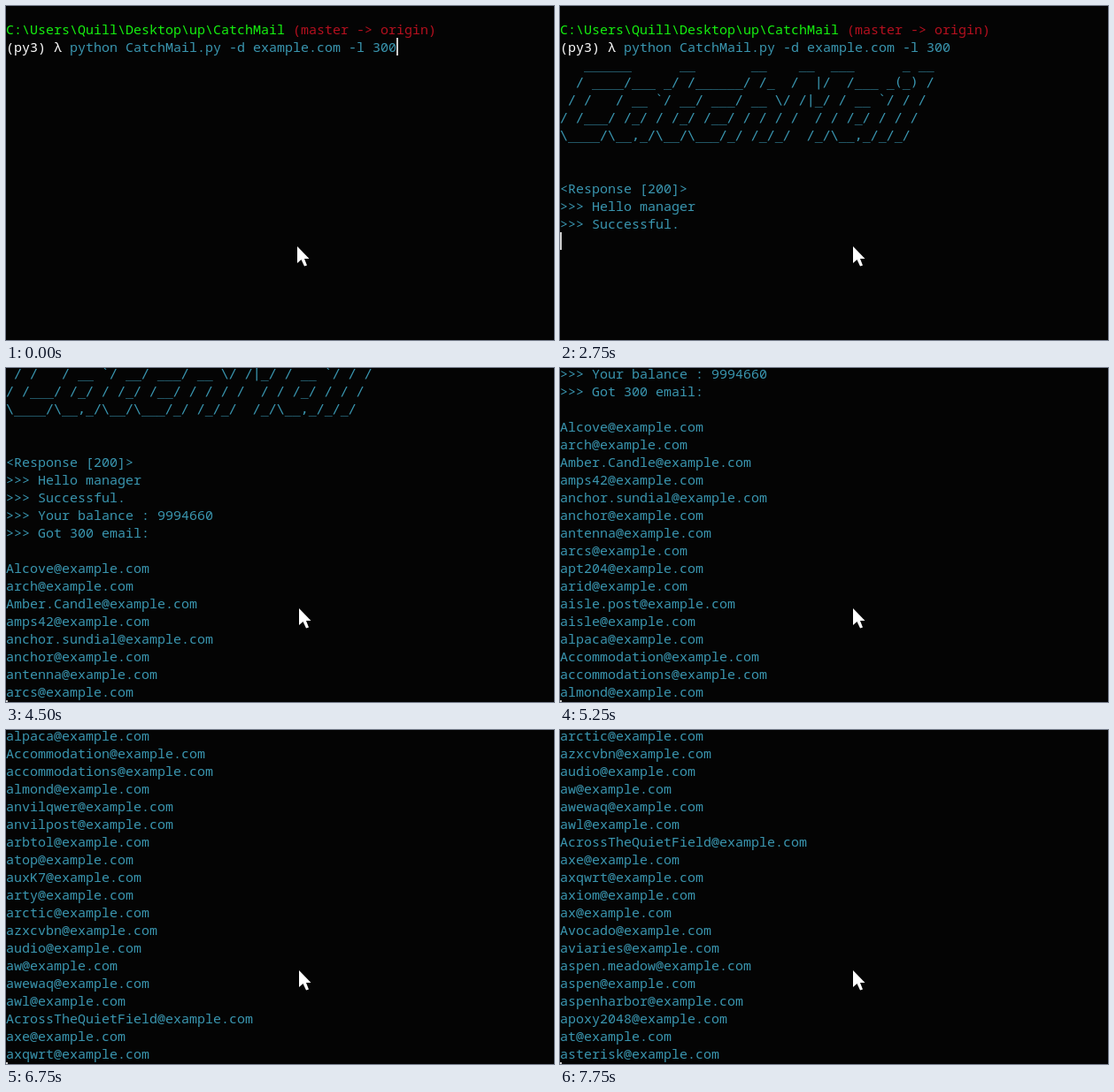
Write an HTML page that moves like this. It is 619 px wide and 378 px high and loops after 8000 ms.

```html
<!DOCTYPE html>
<html lang="en">
<head>
<meta charset="utf-8">
<style>
html, body { margin: 0; width: 100%; height: 100%; overflow: hidden; background: #040404; }
#stage { position: relative; width: 100%; height: 100%; overflow: hidden; }
pre { position: absolute; left: 0; top: -4px; margin: 0; color: #3a96b0;
  font: 15px/20px "Noto Sans Mono", "DejaVu Sans Mono", monospace; }
.path { color: #16f010; }
.branch { color: #b5101f; }
.prompt { color: #fff; }
.banner { font: 14.95px/20px "DejaVu Sans Mono", monospace; }
#caret { position: absolute; width: 2px; height: 20px; background: #ccc; }
#mouse { position: absolute; top: 272px; }
</style>
</head>
<body>
<div id="stage">
<pre id="text"></pre>
<div id="caret"></div>
<svg id="mouse" width="14" height="23"><path d="M0 0V19L4.500 15L8 22.500L11 21.500L8 14H13.500Z" fill="#fff"/></svg>
</div>
<script>
const LOOP = 8000, STEP = 250, ROW = 20, COL = 9, VISIBLE = 19;
const MAIL_START = 3625, MAIL_GAP = 100;

// Blocks of output, the moment each one is printed and its style
const blocks = [
  [0, `
<span class="path">C:\\Users\\Quill\\Desktop\\up\\CatchMail</span> <span class="branch">(master -> origin)</span>
<span class="prompt">(py3) λ</span> python CatchMail.py -d example.com -l 300`],
  [1750, String.raw`   ______      __       __    __  ___      _ __
  / ____/___ _/ /______/ /_  /  |/  /___ _(_) /
 / /   / __ ${"`"}/ __/ ___/ __ \/ /|_/ / __ ${"`"}/ / /
/ /___/ /_/ / /_/ /__/ / / / /  / / /_/ / / /
\____/\__,_/\__/\___/_/ /_/_/  /_/\__,_/_/_/

`, "banner"],
  [2250, "&lt;Response [200]>\n>>> Hello manager"],
  [2750, ">>> Successful."],
  [3000, ">>> Your balance : 9994660"],
  [3250, ">>> Got 300 email:\n"],
];

const users = `Alcove arch Amber.Candle amps42 anchor.sundial anchor antenna arcs apt204 arid
aisle.post aisle alpaca Accommodation accommodations almond anvilqwer anvilpost arbtol atop
auxK7 arty arctic azxcvbn audio aw awewaq awl AcrossTheQuietField axe axqwrt axiom ax Avocado
aviaries aspen.meadow aspen aspenharbor apoxy2048 at asterisk`.split(/\s+/);

const lines = blocks.flatMap(([at, block, style = ""]) =>
  block.split("\n").map(html => ({ at, html: `<div class="${style}">${html || " "}</div>` })));
users.forEach((user, i) =>
  lines.push({ at: MAIL_START + (i + 1) * MAIL_GAP, html: `<div>${user}@example.com</div>` }));

const [text, caret, mouse] = ["text", "caret", "mouse"].map(id => document.getElementById(id));
let last = -1;

function draw(t) {
  const shown = lines.filter(line => line.at <= t).slice(-VISIBLE);
  const typing = t < 500;
  text.innerHTML = shown.map(line => line.html).join("");
  caret.style.left = (typing ? 49 * COL : 0) + "px";
  caret.style.top = (typing ? 2 : shown.length) * ROW - 4 + "px";
  caret.style.visibility = typing || t >= 1250 ? "visible" : "hidden";
  mouse.style.left = 329 + Math.min(2, t / STEP) + "px";
}

function tick() {
  const t = Math.floor(performance.now() % LOOP / STEP) * STEP;
  if (t !== last) draw(last = t);
  requestAnimationFrame(tick);
}
tick();
</script>
</body>
</html>
```
